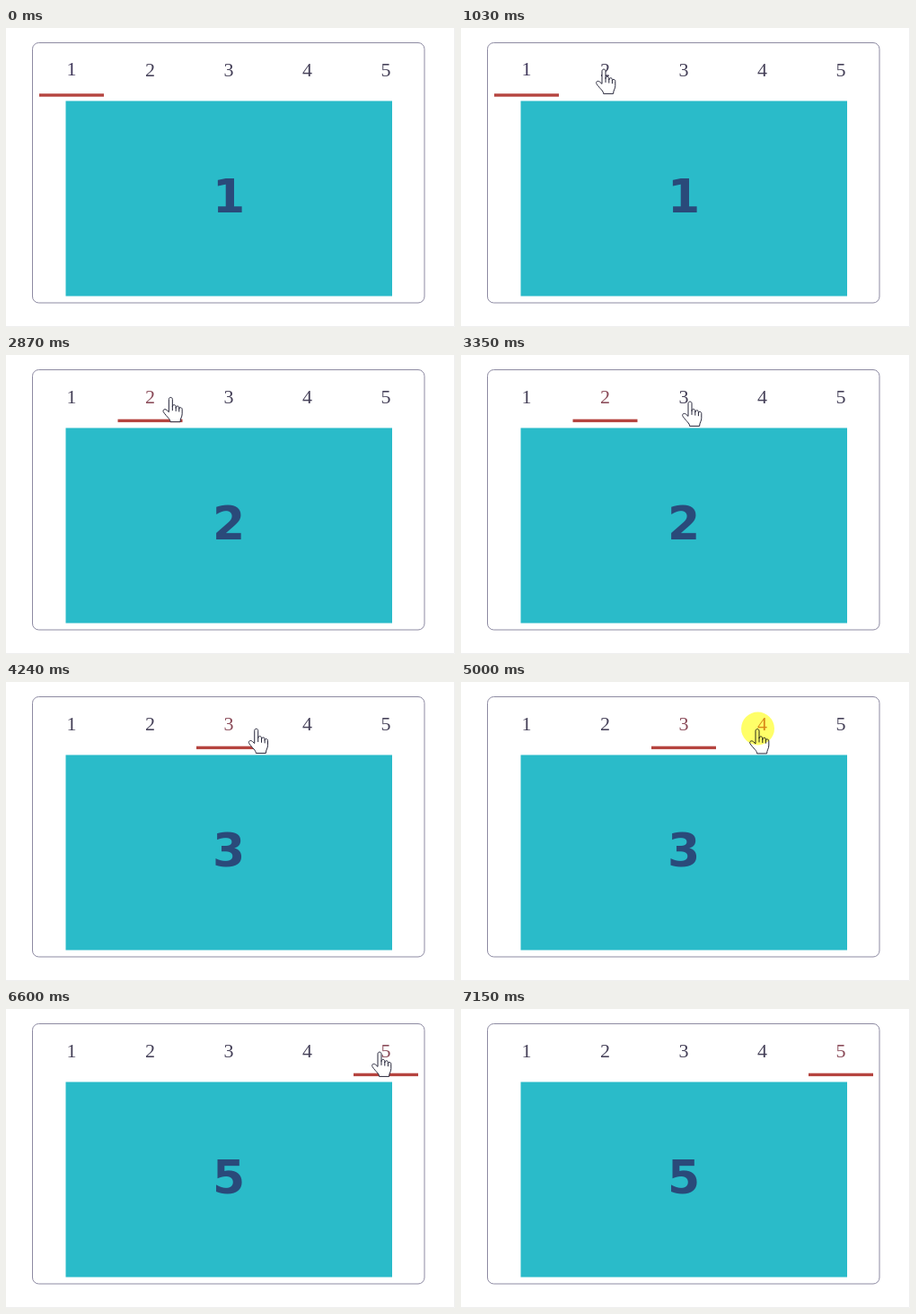
Animation of 500x334 px, one loop 8.06 s. Source, as an HTML page:

```html
<!DOCTYPE html>
<html lang="en">
<head>
<meta charset="utf-8">
<title>Tabs</title>
<style>
  html, body { margin: 0; width: 100%; height: 100%; overflow: hidden; background: #fff; }
  svg { display: block; width: 500px; height: 334px; }
  text { text-anchor: middle; }
  .tab { font: 22px "Liberation Serif", serif; fill: #454058; }
  .tab.active { fill: #8a4a58; }
  .tab.first { fill: #41395c; }
  .tab.pressed { fill: #d9883a; }
  #slide { font: bold 52px "DejaVu Sans", sans-serif; fill: #2a4a7a; }
  #halo { fill: #ffff68; mix-blend-mode: multiply; }
  #cursor path { fill: #fff; stroke: #26263a; stroke-linejoin: round; stroke-linecap: round; }
</style>
</head>
<body>
<svg viewBox="0 0 500 334">
  <path d="M499.5 0V333.5H0" fill="none" stroke="#eee"/>
  <rect x="29.5" y="16.5" width="436.5" height="290.5" rx="7" fill="#fff" stroke="#8d8aa2"/>
  <g id="tabs"></g>
  <rect id="line" width="72" height="3.4" fill="#b5443f"/>
  <rect x="66.5" y="81.5" width="363.5" height="218" fill="#2abbc9"/>
  <text id="slide" x="248" y="205.5"></text>
  <g id="cursor">
    <path id="hand" d="M7 17V3.2C7 .4 11 .4 11 3.2V11.5C11 8.6 14.8 8.8 14.8 11.5V13
      C14.8 10 18.4 10.2 18.4 12.6V14C18.4 11.6 21.8 12 21.8 14.4V19.5C21.8 23 19.6 24.5 19.6 28.4H8.6
      C8.6 25 5 23.4 1 17.4C-.4 15 2.6 13.2 4.4 15ZM11 11.5V15.5M14.8 13V16.2M18.4 14V16.8"/>
    <path id="arrow" d="M8 1V18L12 14.4L14.6 20.4L17.2 19.2L14.6 13.4H20Z"/>
  </g>
  <circle id="halo" r="18.5"/>
</svg>
<script>
const LOOP = 8060, SPACING = 87.5;
const $ = id => document.getElementById(id);

// Cursor moves: start, end, number of steps, destination x and y
const moves = [
  [470, 1030, 9, 150, 45],
  [2870, 3010, 3, 244, 50],
  [3350, 3350, 1, 246, 51],
  [4100, 4580, 8, 321, 51.5],
  [5210, 5560, 6, 407, 47],
  [6940, 7150, 4, 500, 334]
];
// Clicks: press, tab change, release
const clicks = [
  [1790, 1860, 1930],
  [3630, 3690, 3690],
  [5000, 5070, 5070],
  [6050, 6115, 6180]
];

const tabs = [1, 2, 3, 4, 5].map((n, i) => {
  const tab = document.createElementNS("http://www.w3.org/2000/svg", "text");
  tab.setAttribute("x", 73 + i * SPACING);
  tab.textContent = n;
  return $("tabs").appendChild(tab);
});

const ease = p => p * p * (3 - 2 * p);
const show = (id, visible) => $(id).setAttribute("visibility", visible ? "visible" : "hidden");

function cursorAt(t) {
  let x = 225, y = 334;
  for (const [start, end, steps, toX, toY] of moves) {
    if (t < start) break;
    const step = t >= end ? steps : 1 + Math.floor((t - start) / (end - start) * (steps - 1));
    const p = ease(step / steps);
    x += (toX - x) * p;
    y += (toY - y) * p;
  }
  return [x, y];
}

function draw(t) {
  const active = clicks.filter(click => t >= click[1]).length;
  const pressed = clicks.findIndex(([down, , up]) => t >= down && t < up) + 1;
  const [x, y] = cursorAt(t);

  tabs.forEach((tab, i) => {
    const first = i === 0 && active === 0;
    tab.setAttribute("y", first ? 52.5 : 54);
    tab.setAttribute("class", "tab" + (first ? " first" : i === active ? " active" : "")
      + (pressed && i === pressed ? " pressed" : ""));
  });
  $("line").setAttribute("x", 37 + active * SPACING);
  $("line").setAttribute("y", active ? 71.7 : 73.3);
  $("slide").textContent = active + 1;

  $("cursor").setAttribute("transform", `translate(${x} ${y})`);
  show("hand", y < 75);
  show("arrow", y >= 75 && y < 334);
  $("halo").setAttribute("cx", x + 9.5);
  $("halo").setAttribute("cy", y + 0.5);
  show("halo", pressed);
}

function frame() {
  draw(performance.now() % LOOP);
  requestAnimationFrame(frame);
}
frame();
</script>
</body>
</html>
```
